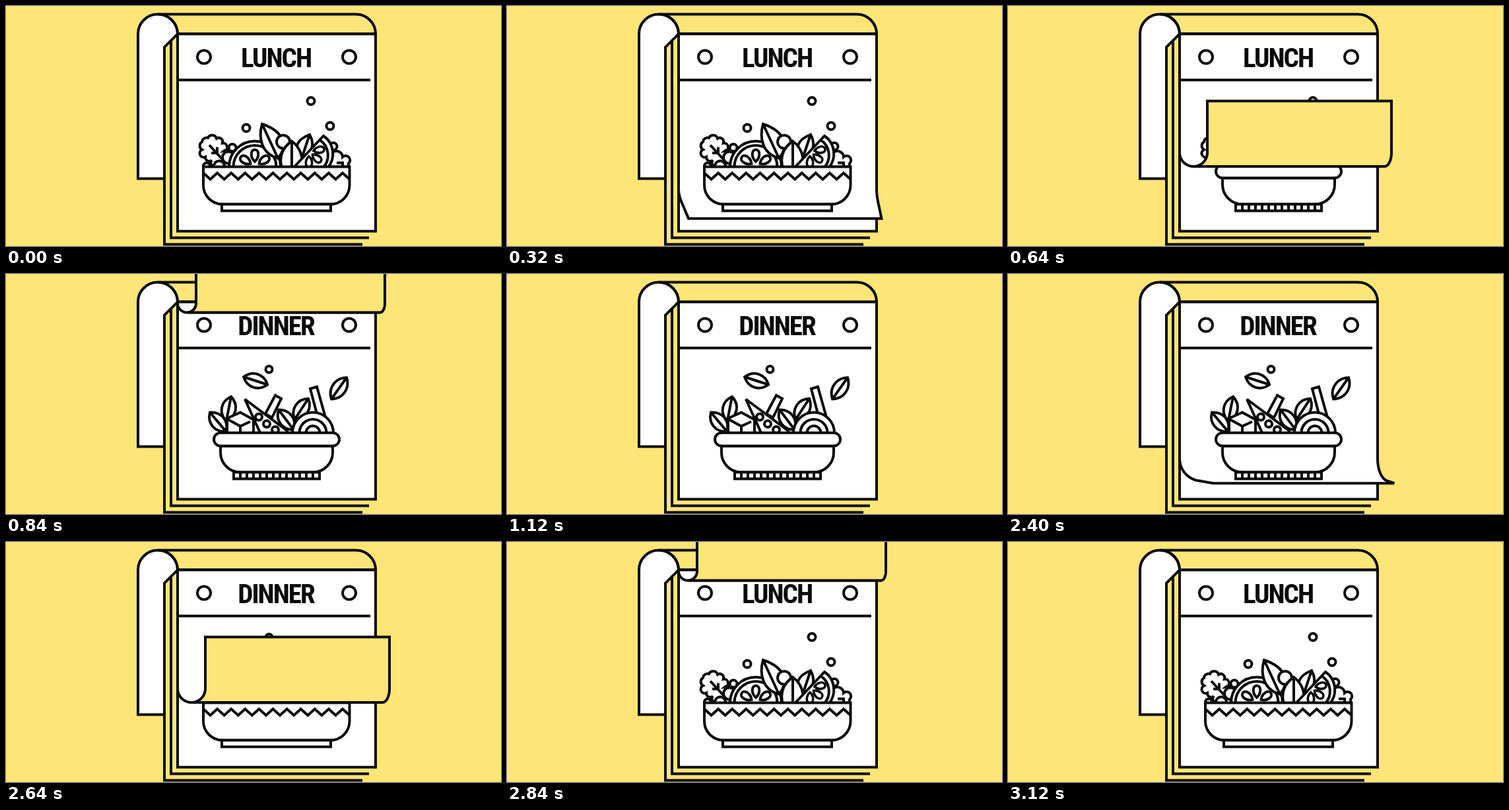
An HTML page that plays this animation: 750x365 px, repeating every 4000 ms.

```html
<!DOCTYPE html>
<html lang="en">
<head>
<meta charset="utf-8">
<title>Lunch and dinner calendar</title>
<style>
  html, body { margin: 0; width: 100%; height: 100%; overflow: hidden; background: #fde578; }
  svg { display: block; width: 100%; height: 100%; }
  .ink { stroke: #0a0a0a; stroke-width: 4; fill: #fff; }
  .sky { fill: #fde578; }
  .line { fill: none; }
  text {
    font: 700 41px "Roboto Condensed", "Open Sans Condensed", Roboto, "Open Sans", sans-serif;
    font-stretch: 50%;
    letter-spacing: -2px;
    text-anchor: middle;
    fill: #0a0a0a;
    stroke: none;
  }
</style>
</head>
<body>
<svg viewBox="0 -.5 750 365">
  <defs>
    <path id="leaf" d="M0 0C-14 10 -14 28 0 38C14 28 14 10 0 0ZV38"/>
    <path id="seed" d="M0 -8c-7 -6 -7 -18 0 -18s7 12 0 18z"/>
    <g id="head">
      <circle cx="300" cy="77" r="10"/>
      <circle cx="520" cy="77" r="10"/>
      <path d="M260 112H552"/>
    </g>

    <g id="lunch" class="ink">
      <use href="#head"/>
      <text x="409" y="92">LUNCH</text>
      <circle cx="462" cy="144" r="5.5"/>
      <circle cx="364" cy="185" r="5.5"/>
      <circle cx="491" cy="182" r="5.5"/>
      <!-- lettuce -->
      <circle cx="304" cy="243" r="5"/>
      <circle cx="343" cy="215" r="5.5"/>
      <path d="M338 229A5 5 0 0 0 330 220A6 6 0 0 0 328 208A6 6 0 0 0 319 201A7 7 0 0 0 306 200A7 7 0 0 0 297 206A7 7 0 0 0 297 218A6 6 0 0 0 302 229A6 6 0 0 0 312 234A5 5 0 0 0 321 242Z"/>
      <path class="line" d="M308 211L330 235M320 223V214M320 223H311"/>
      <circle cx="337" cy="230" r="9"/>
      <circle cx="323" cy="243" r="8"/>
      <!-- tomato -->
      <circle cx="377" cy="244" r="39"/>
      <circle cx="377" cy="244" r="32.5"/>
      <g transform="translate(377 244)">
        <use href="#seed"/>
        <use href="#seed" transform="rotate(-55)"/>
        <use href="#seed" transform="rotate(55)"/>
      </g>
      <!-- leaves -->
      <path d="M388 179C382 200 387 224 412 231C426 215 424 191 388 179ZL412 231"/>
      <circle cx="420" cy="206" r="10"/>
      <path d="M460 195C440 203 436 214 444 234L458 226C466 216 466 206 460 195ZL449 228"/>
      <path d="M433 205C416 217 414 232 418 246H446C452 230 446 215 433 205ZV246"/>
      <!-- cauliflower -->
      <circle cx="496" cy="213" r="5.5"/>
      <path d="M491 230A9.5 9.5 0 0 1 510 229A6.5 6.5 0 0 1 519 239V244H490Z"/>
      <path class="line" d="M501 238H510V244"/>
      <!-- lemon -->
      <path d="M435 246L481 197A33 33 0 0 1 487 246Z"/>
      <path class="line" d="M475 203A28 28 0 0 1 480 246"/>
      <g transform="translate(459 221) scale(.9)">
        <use href="#seed" transform="rotate(80)"/>
        <use href="#seed" transform="rotate(130)"/>
        <use href="#seed" transform="rotate(180)"/>
      </g>
      <!-- bowl -->
      <path d="M299 244H520.5V272A29 29 0 0 1 491.5 301H328A29 29 0 0 1 299 272Z"/>
      <path id="zigzag" class="line"/>
      <path d="M327 301H492V311H327Z"/>
    </g>

    <g id="dinner" class="ink">
      <use href="#head"/>
      <text x="409" y="92">DINNER</text>
      <circle cx="398.5" cy="144.5" r="5"/>
      <use href="#leaf" transform="translate(360 156) rotate(-72)"/>
      <use href="#leaf" transform="translate(516 157) rotate(35) scale(1 1.05)"/>
      <use href="#leaf" transform="translate(341 186) rotate(11)"/>
      <use href="#leaf" transform="translate(309 210) rotate(-40)"/>
      <!-- cube -->
      <path d="M335 243V219L355 210L375 221V243Z"/>
      <path class="line" d="M335 220L355 231L370 224M355 231V243"/>
      <!-- sticks and wedge -->
      <path d="M408 184L417 189L403 218L393 212Z"/>
      <path d="M362 190L426 238V243H386Z"/>
      <circle cx="383" cy="217" r="5"/>
      <circle cx="395" cy="227.5" r="5"/>
      <circle cx="408" cy="236.5" r="5"/>
      <use href="#leaf" transform="translate(413 206) rotate(-37)"/>
      <use href="#leaf" transform="translate(458 189) rotate(33)"/>
      <path d="M461 174L471 171L483 214L472 216Z"/>
      <!-- onion -->
      <circle cx="465" cy="241" r="31"/>
      <circle cx="465" cy="241" r="20.5"/>
      <circle cx="465" cy="241" r="10.5"/>
      <!-- bowl -->
      <path d="M325 261V271A30 30 0 0 0 355 301H465A30 30 0 0 0 495 271V261Z"/>
      <rect x="315" y="241" width="190" height="20" rx="10"/>
      <path d="M345 301H475V311H345Z"/>
      <path id="ticks" class="line"/>
    </g>
    <clipPath id="cut"><path id="cutShape"/></clipPath>
  </defs>

  <g class="ink">
    <path d="M260 42A30 30 0 0 0 200 42V262H260Z"/>
    <path class="sky" d="M260 42A30 30 0 0 0 230 12H530A30 30 0 0 1 560 42Z"/>
    <g id="arch">
      <path id="inner"/>
      <path id="outer" class="sky"/>
    </g>
    <path class="sky" d="M540 362H240V62L260 42"/>
    <path class="line" d="M550 352H250V52"/>
    <path d="M260 42H560V342H260Z"/>
  </g>
  <use id="under"/>
  <g id="sheet" class="ink">
    <path id="front"/>
    <g clip-path="url(#cut)"><use id="over"/></g>
    <path id="back" class="sky"/>
  </g>
</svg>
<script>
  const $ = id => document.getElementById(id);
  const LOOP = 4000, HALF = 2000, FRAME = 40, LIFT_END = 840, FLIP_END = 1120;
  const LEFT = 260, RIGHT = 560, TOP = 42;

  // time, y where the curl starts, curl radius, curl angle, straight tail
  const curlKeys = [
    [0, 292, 50, 0, 50],
    [160, 288, 50, .12, 46],
    [320, 277, 50, .4, 28.4],
    [440, 282, 26, 1.9, 20],
    [560, 263, 24, 2.85, 36.4],
    [600, 244, 23, 3, 56],
    [640, 222.5, 21, Math.PI, 78.5],
    [680, 186, 22, Math.PI, 110],
    [720, 144, 22, Math.PI, 152],
    [760, 100, 22, Math.PI, 200],
    [800, 64, 20, Math.PI, 260],
    [840, 44, 14, Math.PI, 300]
  ];
  // time, y of the arch shoulder, y of the free edge behind
  const archKeys = [
    [880, -128, -60],
    [920, -58, -30],
    [960, -8, 0],
    [1000, 20, 40],
    [1040, 36, 95],
    [1080, 41, 148]
  ];

  function sample(keys, t) {
    let i = 1;
    while (i < keys.length - 1 && keys[i][0] < t) i++;
    const a = keys[i - 1], b = keys[i];
    const k = Math.min(1, Math.max(0, (t - a[0]) / (b[0] - a[0])));
    return a.slice(1).map((v, n) => v + (b[n + 1] - v) * k);
  }

  // points are [depth, y]; depth shifts the left side fully, the right side by half
  const left = ([z, y]) => [LEFT + z, y];
  const right = ([z, y]) => [RIGHT + z / 2, y];
  const poly = pts => 'M' + pts.map(p => p.map(v => v.toFixed(2)).join(' ')).join('L') + 'Z';
  const band = side => poly([...side.map(left), ...side.map(right).reverse()]);

  function arc(y, r, from, to) {
    return Array.from({ length: 17 }, (_, i) => {
      const a = from + (to - from) * i / 16;
      return [r * (1 - Math.cos(a)), y + r * Math.sin(a)];
    });
  }

  function drawCurl(p) {
    const [y, r, angle, tail] = sample(curlKeys, p);
    const turn = Math.min(angle, Math.PI / 2), folded = angle > turn;
    const end = [r * (1 - Math.cos(angle)) + tail * Math.sin(angle),
                 y + r * Math.sin(angle) + tail * Math.cos(angle)];
    const face = [[0, TOP], ...arc(y, r, 0, turn)];
    if (!folded) face.push(end);
    const shape = band(face);
    $('front').setAttribute('d', shape);
    $('cutShape').setAttribute('d', shape);
    $('back').setAttribute('d', folded ? band([...arc(y, r, turn, angle), end]) : '');
  }

  function drawArch(p) {
    const [y, edge] = sample(archKeys, p);
    $('inner').setAttribute('d', `M260 42V${y}A30 30 0 0 0 200 ${y}V${edge}H260Z`);
    $('outer').setAttribute('d',
      `M260 42V${y}A30 30 0 0 0 230 ${y - 30}H530A30 30 0 0 1 560 ${y}V42Z`);
  }

  const show = (id, on) => $(id).setAttribute('display', on ? 'inline' : 'none');

  function draw(now) {
    const t = Math.floor(now % LOOP / FRAME) * FRAME, p = t % HALF;
    const [from, to] = t < HALF ? ['#lunch', '#dinner'] : ['#dinner', '#lunch'];
    const lifting = p > 0 && p <= LIFT_END;
    const falling = p > LIFT_END && p < FLIP_END;
    $('under').setAttribute('href', p ? to : from);
    $('over').setAttribute('href', from);
    show('sheet', lifting);
    show('arch', falling);
    if (lifting) drawCurl(p);
    if (falling) drawArch(p);
  }

  $('zigzag').setAttribute('d', 'M' + Array.from({ length: 22 },
    (_, i) => `${299 + i * 10.55} ${i % 2 ? 263 : 253.5}`).join('L'));
  $('ticks').setAttribute('d', Array.from({ length: 12 },
    (_, i) => `M${355 + i * 10} 301V311`).join(''));

  const start = performance.now();
  function tick() {
    draw(performance.now() - start);
    requestAnimationFrame(tick);
  }
  tick();
</script>
</body>
</html>
```
